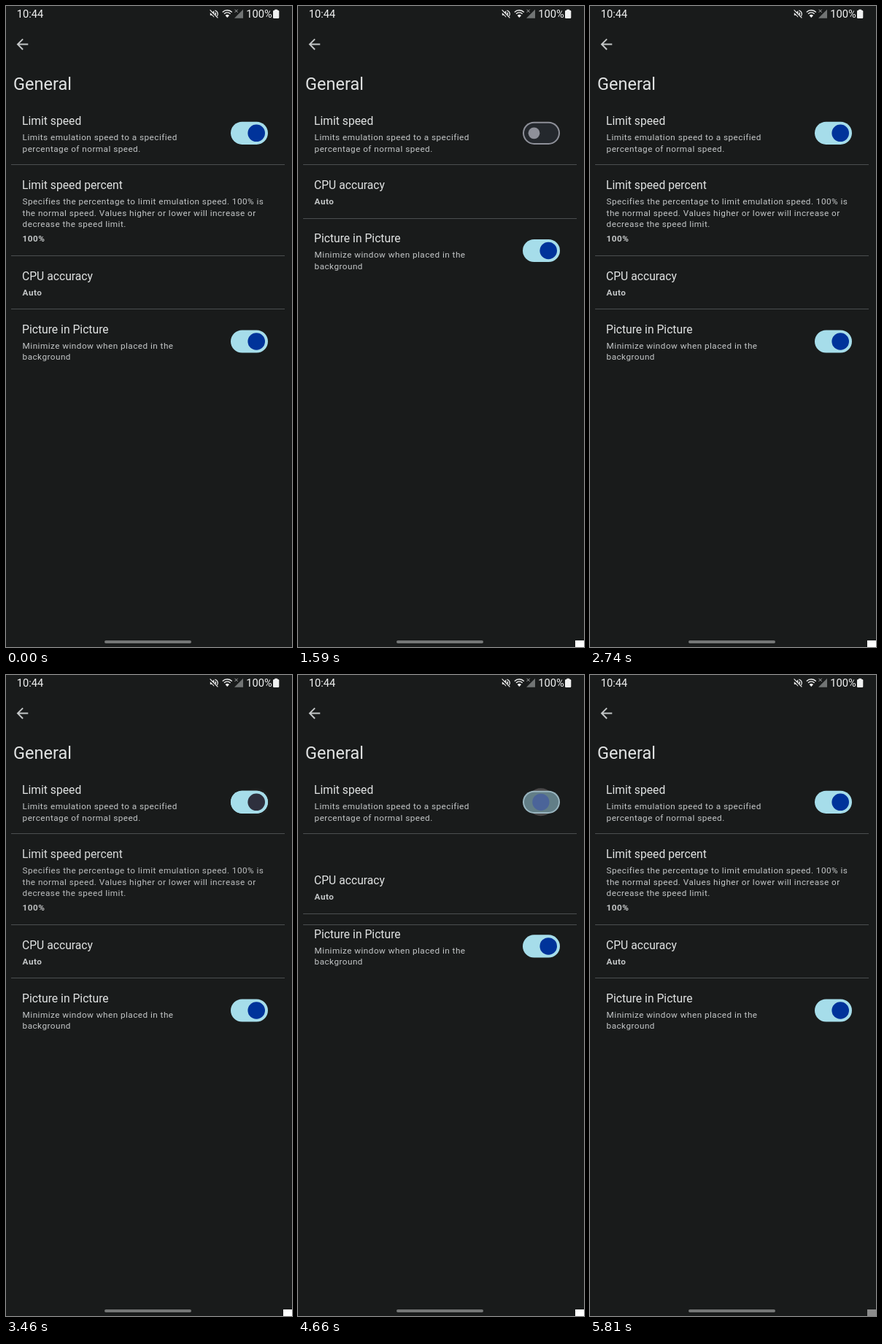
These frames come from a looping animation (392x879 px, 5880 ms). An HTML page with a canvas:

```html
<!DOCTYPE html>
<html lang="en">
<head>
<meta charset="utf-8">
<title>General settings</title>
<style>
  html, body { margin: 0; width: 100%; height: 100%; overflow: hidden; background: #191b1b; }
  canvas { display: block; width: 392px; height: 879px; }
</style>
</head>
<body>
<canvas id="stage"></canvas>
<script>
const W = 392, H = 879, LOOP = 5880;
const FIRST_CHANGE = 1120, TICK = 67;
const ROW_SHIFT = 124.5;
const BG = '#191b1b', BRIGHT = '#e1e3e3', SOFT = '#c4c7c8';
const GREY = [142, 144, 153], DARK = [46, 48, 62], BLUE = [0, 51, 154];
const TRACK_OFF = [36, 40, 45], TRACK_ON = [166, 221, 234];
const TOGGLES = [
  { at: 1115, on: false },
  { at: 2305, on: true },
  { at: 3460, on: false },
  { at: 4550, on: true }
];

const canvas = document.getElementById('stage');
const ctx = canvas.getContext('2d');
const ratio = window.devicePixelRatio || 1;
canvas.width = W * ratio;
canvas.height = H * ratio;

const clamp = v => Math.max(0, Math.min(1, v));
const lerp = (a, b, p) => a + (b - a) * p;
const ease = v => (1 - Math.cos(Math.PI * clamp(v))) / 2;
const rgb = c => `rgb(${c.map(Math.round).join(',')})`;
const mix = (a, b, p) => rgb(a.map((v, i) => lerp(v, b[i], p)));

function text(str, x, y, size, color, weight = 400, spacing = 0) {
  ctx.font = `${weight} ${size}px Roboto, sans-serif`;
  ctx.letterSpacing = spacing + 'px';
  ctx.fillStyle = color;
  ctx.fillText(str, x, y);
}

function box(x, y, w, h, r, color) {
  ctx.fillStyle = color;
  ctx.beginPath();
  ctx.roundRect(x, y, w, h, r);
  ctx.fill();
}

function disc(x, y, r, color) {
  ctx.fillStyle = color;
  ctx.beginPath();
  ctx.arc(x, y, r, 0, Math.PI * 2);
  ctx.fill();
}

function icon(path, x, y, scale, color) {
  ctx.save();
  ctx.translate(x, y);
  ctx.scale(scale, scale);
  ctx.fillStyle = color;
  ctx.fill(new Path2D(path));
  ctx.restore();
}

function line(x1, y1, x2, y2, width, color) {
  ctx.strokeStyle = color;
  ctx.lineWidth = width;
  ctx.beginPath();
  ctx.moveTo(x1, y1);
  ctx.lineTo(x2, y2);
  ctx.stroke();
}

function divider(y) {
  ctx.fillStyle = '#4b4e50';
  ctx.fillRect(7, Math.floor(y), 375, 1);
}

function drawStatusBar() {
  text('10:44', 14.7, 16, 14.7, '#f0f1f1');
  icon('M3 9v6h4l5 5V4L7 9z', 278, 3.8, 0.6, '#f0f1f1');
  icon('M14 7.5a5 5 0 0 1 2 7.5l-2-2zM14 3a9 9 0 0 1 5.5 14.5L18 16A7 7 0 0 0 14 5z', 278, 3.8, 0.6, '#f0f1f1');
  line(279.2, 6.6, 290, 17.4, 2.6, BG);
  line(279.6, 5.4, 290.4, 16.4, 1.2, '#f0f1f1');

  ctx.strokeStyle = '#f0f1f1';
  ctx.lineWidth = 1.4;
  for (const r of [9.2, 6.1]) {
    ctx.beginPath();
    ctx.arc(303.3, 15, r, -Math.PI * 0.75, -Math.PI * 0.25);
    ctx.stroke();
  }
  icon('M0 0l-2.7-3a4 4 0 0 1 5.4 0z', 303.3, 16, 1, '#f0f1f1');

  icon('M12 0v12H0z', 313, 4.8, 1, '#717474');
  line(313.6, 4.8, 317.6, 8.8, 1, '#a9abab');
  line(317.6, 4.8, 313.6, 8.8, 1, '#a9abab');

  text('100%', 329.2, 16, 14.7, '#f0f1f1');
  box(366, 6, 8.3, 11, 1.3, '#f0f1f1');
  box(368.2, 4.7, 3.9, 2, 0.5, '#f0f1f1');
}

function drawHeader() {
  icon('M20 11H7.83l5.59-5.59L12 4l-8 8 8 8 1.41-1.41L7.83 13H20z', 10.7, 40.8, 0.98, SOFT);
  text('General', 10, 115, 23.5, BRIGHT);
}

function drawRow(top, title, lines, value) {
  text(title, 22, top + 33, 15.7, BRIGHT);
  lines.forEach((str, i) => text(str, 22.6, top + 54 + i * 15.65, 11.75, SOFT, 400, 0.46));
  if (value) text(value, 22.6, top + (lines.length ? 105 : 54), 11.75, SOFT, 700, 0.46);
}

function drawSwitch(y, p, thumbOff, thumbOn, ripple) {
  const x = lerp(323.5, 343.2, p);
  if (ripple > 0) disc(x, y, 19, `rgba(225,215,220,${0.25 * ripple})`);
  box(308, y - 15.6, 51, 31.2, 15.6, mix(GREY, TRACK_ON, p));
  const edge = 2 * clamp((1 - p) * 4);
  if (edge) {
    box(308 + edge, y - 15.6 + edge, 51 - 2 * edge, 31.2 - 2 * edge, 15.6 - edge,
      mix(TRACK_OFF, TRACK_ON, p));
  }
  disc(x, y, lerp(7.9, 11.8, clamp(p * 2)), mix(thumbOff, thumbOn, p));
}

// The new row fades in after the others slide down; on removal the order is reversed.
function stateAt(t) {
  const toggle = TOGGLES.filter(e => e.at <= t).pop();
  if (!toggle) return { slide: 1, fade: 1, knob: 1, ripple: 0, reserved: true, thumb: BLUE };
  const age = t - toggle.at;
  const press = clamp(age / 60) * clamp((420 - age) / 200);
  if (toggle.on) {
    return {
      slide: ease((age - 30) / 250),
      fade: clamp((age - 280) / 120),
      knob: ease(age / 250),
      ripple: press, reserved: true, thumb: BLUE
    };
  }
  return {
    slide: 1 - ease((age - 120) / 250),
    fade: 1 - clamp(age / 120),
    knob: 1 - ease(age / 250),
    ripple: press, reserved: age < 120, thumb: DARK
  };
}

function draw(time) {
  const t = FIRST_CHANGE + Math.floor((time - FIRST_CHANGE + 15) / TICK) * TICK;
  const s = stateAt(t);
  const top = 218 + ROW_SHIFT * s.slide;

  ctx.setTransform(ratio, 0, 0, ratio, 0, 0);
  ctx.fillStyle = BG;
  ctx.fillRect(0, 0, W, H);
  drawStatusBar();
  drawHeader();

  drawRow(130, 'Limit speed', [
    'Limits emulation speed to a specified',
    'percentage of normal speed.'
  ]);
  drawSwitch(174.3, s.knob, GREY, s.thumb, s.ripple);
  divider(217.5);

  if (s.fade > 0) {
    ctx.globalAlpha = s.fade;
    drawRow(218, 'Limit speed percent', [
      'Specifies the percentage to limit emulation speed. 100% is',
      'the normal speed. Values higher or lower will increase or',
      'decrease the speed limit.'
    ], '100%');
    ctx.globalAlpha = 1;
  }
  if (s.reserved) divider(342.5);

  drawRow(top, 'CPU accuracy', [], 'Auto');
  divider(top + 73);
  drawRow(top + 73.3, 'Picture in Picture', [
    'Minimize window when placed in the',
    'background'
  ]);
  drawSwitch(top + 117.5, 1, GREY, BLUE, 0);

  box(135, 870, 119, 4, 2, '#757777');
  if (time >= FIRST_CHANGE) {
    ctx.fillStyle = time < 5810 ? '#ffffff' : '#8c8c8c';
    ctx.fillRect(380, 870, 12, 9);
  }
}

const start = performance.now();
function frame() {
  draw((performance.now() - start) % LOOP);
  requestAnimationFrame(frame);
}
frame();
</script>
</body>
</html>
```
